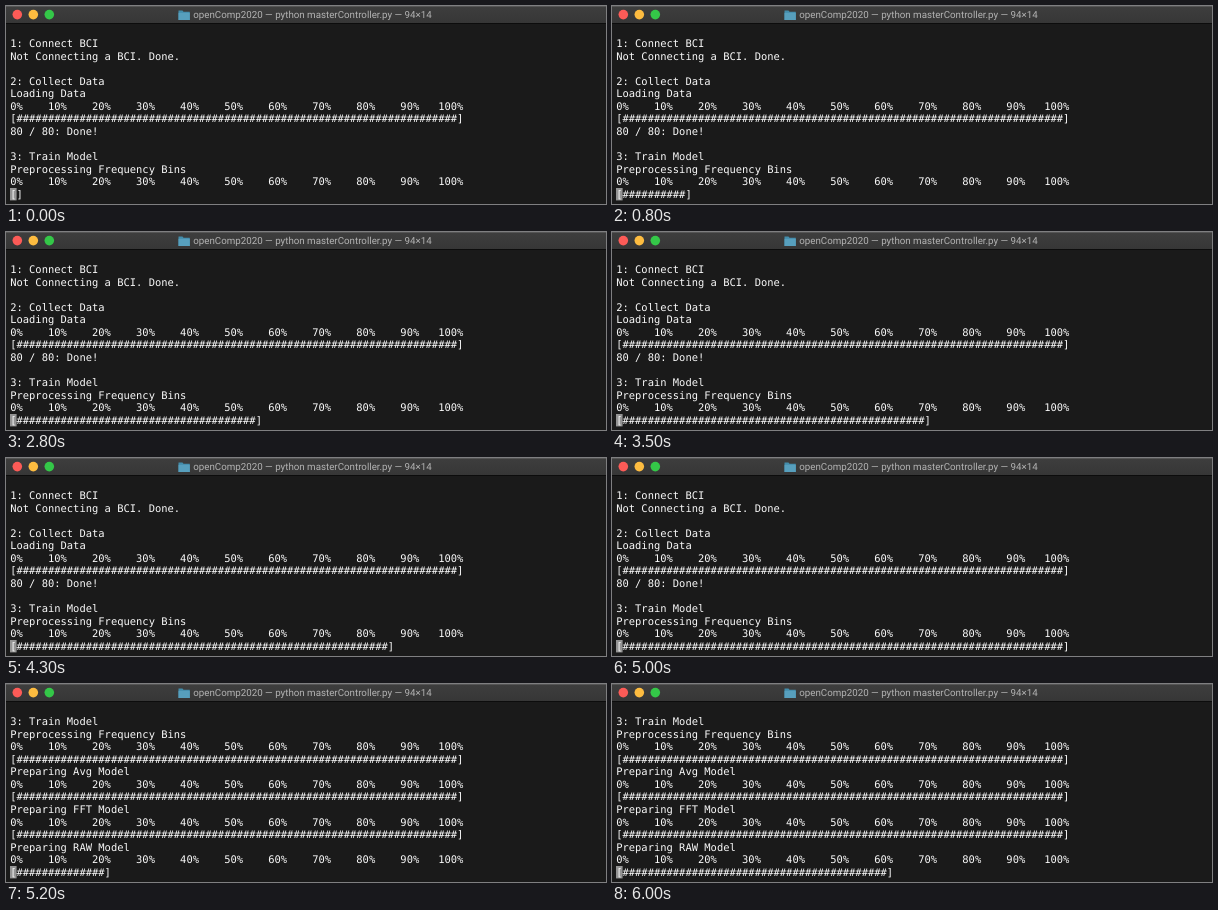
These frames come from a looping animation (600 by 198 pixels, 6100 ms). An HTML page:

```html
<!DOCTYPE html>
<html lang="en">
<head>
<meta charset="utf-8">
<title>Training progress</title>
<style>
  html, body { margin: 0; width: 100%; height: 100%; overflow: hidden; background: #1a1a1a; }
  svg { display: block; width: 600px; height: 198px; }
  text { text-rendering: geometricPrecision; white-space: pre; }
  .title { font: 9.75px Roboto, Inter, sans-serif; fill: #b3b3b3; text-anchor: middle; }
  .row { font: 10.465px "DejaVu Sans Mono", "Liberation Mono", monospace; fill: #fafafa; }
</style>
</head>
<body>
<svg viewBox="0 0 600 198">
  <defs>
    <linearGradient id="bar" x2="0" y2="1">
      <stop offset="0" stop-color="#3e3e3e"/>
      <stop offset="1" stop-color="#363636"/>
    </linearGradient>
  </defs>
  <rect width="600" height="198" fill="#1a1a1a"/>
  <rect width="600" height="17.5" fill="url(#bar)"/>
  <rect y="17" width="600" height="1" fill="#0c0c0c"/>
  <rect width="600" height="0.8" fill="#5c5c5c"/>
  <circle cx="11.3" cy="8.6" r="4.8" fill="#fc5b57"/>
  <circle cx="27.3" cy="8.6" r="4.8" fill="#fdbc40"/>
  <circle cx="43.3" cy="8.6" r="4.8" fill="#34c748"/>
  <path d="M172.5 4.5h4l1 1.2h6.3v8.3h-11.3z" fill="#438dab"/>
  <path d="M172.5 6.8h11.3v7.2h-11.3z" fill="#579fbd"/>
  <text class="title" x="306.5" y="12.1">openComp2020 — python masterController.py — 94×14</text>
  <rect x="4" y="182" width="6.6" height="12.4" fill="#949494"/>
  <g id="rows"></g>
</svg>
<script>
const LOOP = 6100, ROWS = 13, PITCH = 12.58, FULL = 70;

// Each run: start time, number of 100 ms steps, first and last bar length
const preprocess = [
  [0, 1, 0, 0], [100, 5, 1, 7], [700, 4, 8, 14], [1200, 4, 15, 21],
  [1700, 4, 22, 28], [2200, 7, 30, 38], [2900, 7, 39, 48],
  [3600, 7, 49, 57], [4300, 7, 59, 68], [5000, 1, 70, 70]
];
const raw = [[5100, 1, 0, 0], [5200, 1, 14, 14], [5800, 1, 28, 28], [6000, 1, 42, 42]];
const SCROLL_AT = 5100;

let scale = "0%    ";
for (let p = 10; p <= 90; p += 10) scale += (p + "%").padEnd(p < 90 ? 7 : 6);
scale += "100%";

const bar = n => "[" + "#".repeat(n) + "]";
const meter = (label, n) => [label, scale, bar(n)];

function lengthAt(runs, t) {
  const [start, steps, from, to] = runs.filter(r => r[0] <= t).pop();
  if (steps === 1) return to;
  const step = Math.min(Math.floor((t - start) / 100), steps - 1);
  return Math.round(from + (to - from) * step / (steps - 1));
}

function screenAt(t) {
  const log = [
    "1: Connect BCI", "Not Connecting a BCI. Done.", "",
    "2: Collect Data", ...meter("Loading Data", FULL), "80 / 80: Done!", "",
    "3: Train Model", ...meter("Preprocessing Frequency Bins", lengthAt(preprocess, t))
  ];
  if (t >= SCROLL_AT) {
    log.push(
      ...meter("Preparing Avg Model", FULL),
      ...meter("Preparing FFT Model", FULL),
      ...meter("Preparing RAW Model", lengthAt(raw, t))
    );
  }
  return log.slice(-ROWS);
}

const group = document.getElementById("rows");
const rows = Array.from({ length: ROWS }, (_, i) => {
  const row = document.createElementNS("http://www.w3.org/2000/svg", "text");
  row.setAttribute("class", "row");
  row.setAttribute("x", 4.2);
  row.setAttribute("y", 41 + i * PITCH);
  return group.appendChild(row);
});

function draw(t) {
  screenAt(t).forEach((line, i) => {
    if (rows[i].textContent !== line) rows[i].textContent = line;
  });
}

const begin = performance.now();
function tick() {
  draw((performance.now() - begin) % LOOP);
  requestAnimationFrame(tick);
}
tick();
</script>
</body>
</html>
```
